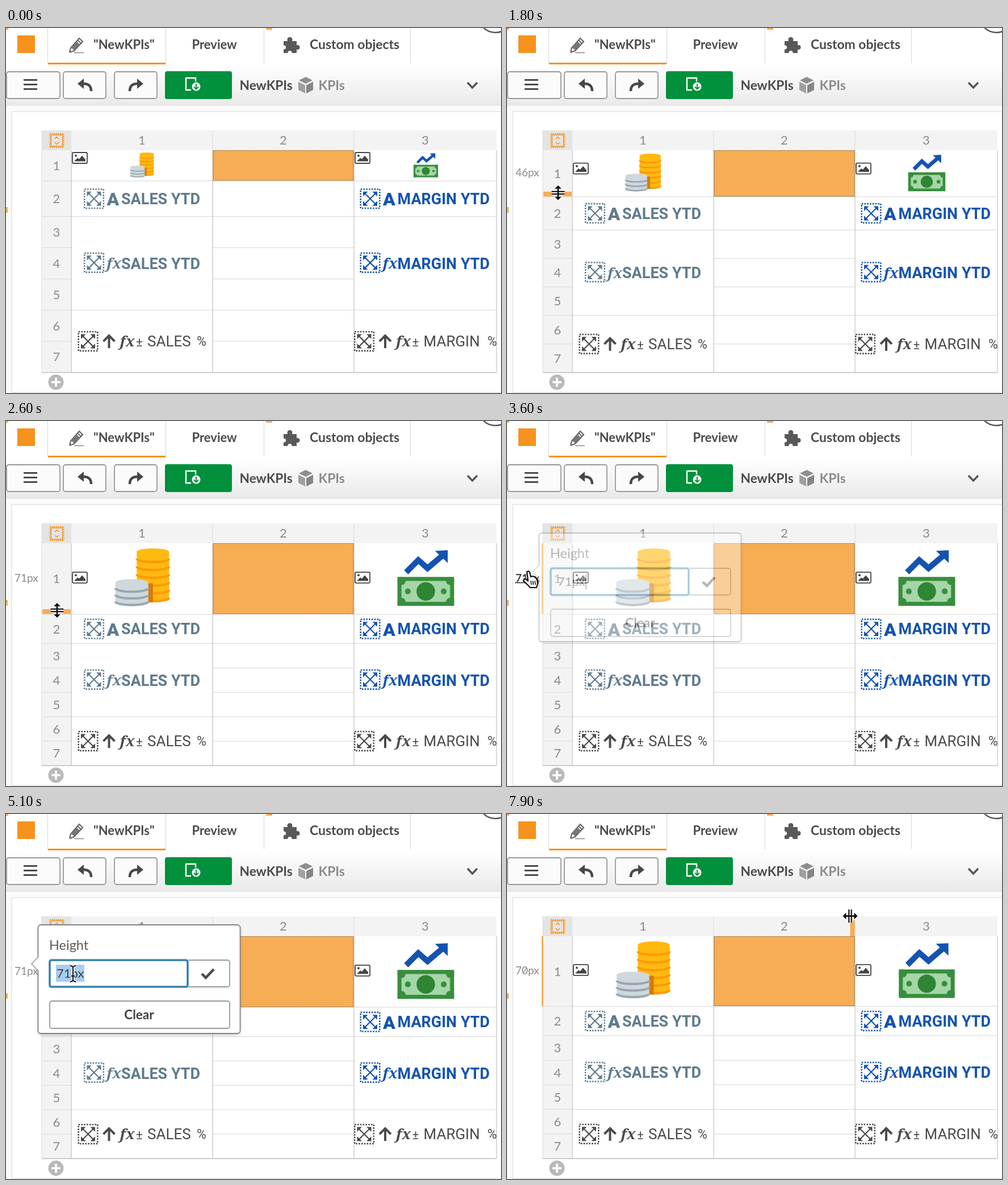
Recreate the animation shown at these times as an HTML page with a canvas. Size 872x642 px, loop 8 s.

```html
<!DOCTYPE html>
<html lang="en">
<head>
<meta charset="utf-8">
<title>Row height editor</title>
<style>
html, body { margin: 0; width: 100%; height: 100%; overflow: hidden; background: #fff; }
canvas { display: block; }
</style>
</head>
<body>
<canvas id="stage" width="872" height="642"></canvas>
<script>
const stage = document.getElementById('stage').getContext('2d');
const layer = document.createElement('canvas');
layer.width = 872;
layer.height = 642;
let c = stage;
const LOOP = 8000, STEP = 100, TOP = 215, BOTTOM = 606, PX = 1.76;
const ORANGE = '#f6921e', SOFT = '#f7ad54', STEEL = '#5f7b8c', BLUE = '#1453b0', INK = '#4a4a4a';
const UI = 'Lato, "Open Sans", sans-serif', CELL = 'Roboto, sans-serif', SERIF = '"Noto Serif", serif';

// ---- helpers ----
function box(x, y, w, h, color) { c.fillStyle = color; c.fillRect(x, y, w, h); }
function path(points, closed) {
  c.beginPath();
  points.forEach(([x, y]) => c.lineTo(x, y));
  if (closed) c.closePath();
}
function fill(color) { c.fillStyle = color; c.fill(); }
function stroke(color, width) { c.strokeStyle = color; c.lineWidth = width; c.stroke(); }
function poly(points, color) { path(points, true); fill(color); }
function line(points, color, width) { path(points); stroke(color, width); }
function disc(x, y, r, color) { c.beginPath(); c.arc(x, y, r, 0, 7); fill(color); }
function panel(x, y, w, h, r, border, width, color) {
  c.beginPath();
  c.roundRect(x, y, w, h, r);
  if (color) fill(color);
  if (border) stroke(border, width);
}
// y is the middle of the capitals
function text(s, x, y, size, color, style = '', align = 'left', family = UI) {
  c.font = `${style} ${size}px ${family}`;
  c.fillStyle = color;
  c.textAlign = align;
  c.fillText(s, x, y + size * .36);
}
function sizeText(s, x, y, size, color, style) {
  text(s, x, y, size, color, style);
  const i = s.indexOf('0');
  if (i < 0) return;
  const left = x + c.measureText(s.slice(0, i)).width, w = c.measureText('0').width;
  line([[left + w * .3, y + size * .2], [left + w * .7, y - size * .2]], color, 1.3);
}
function at(x, y, scale, draw) {
  c.save();
  c.translate(x, y);
  c.scale(scale, scale);
  draw();
  c.restore();
}
// keys: [time, value, value...], linear between neighbours
function key(t, keys) {
  const i = keys.findIndex(k => k[0] > t);
  if (i === 0) return keys[0].slice(1);
  if (i < 0) return keys[keys.length - 1].slice(1);
  const a = keys[i - 1], b = keys[i], u = (t - a[0]) / (b[0] - a[0]);
  return a.slice(1).map((v, j) => v + (b[j + 1] - v) * u);
}

// ---- top bars ----
function bars() {
  box(0, 0, 872, 642, '#fff');
  const shade = c.createLinearGradient(0, 64, 0, 137);
  shade.addColorStop(0, '#fff');
  shade.addColorStop(1, '#e9e9e9');
  box(0, 64, 872, 73, shade);
  box(0, 137, 872, 505, '#fbfbfb');
  panel(10, 147, 880, 494, 0, '#e3e3e3', 1.5, '#fff');
  [73, 281, 454, 712].forEach(x => box(x, 0, 1, 62, '#d6d6d6'));
  box(74, 61, 207, 3, ORANGE);
  box(0, 0, 4, 3, SOFT);
  box(458, 0, 11, 3, SOFT);
  box(0, 315, 3, 10, SOFT);
  box(20, 13, 31, 31, ORANGE);
  c.beginPath();
  c.arc(862, -22, 30, 0, Math.PI);
  stroke('#555', 2.5);

  // pencil
  line([[112, 43], [114, 35], [129, 18], [135, 24], [120, 40], [112, 43]], '#666', 2.2);
  line([[126, 21], [132, 27]], '#666', 2);
  poly([[115, 35], [125, 24], [130, 29], [120, 39]], '#777');
  line([[120, 43.5], [137, 43.5]], '#777', 1.3);
  text('"NewKPIs"', 154, 29, 22, INK, 'bold');
  text('Preview', 327.5, 29, 22, INK, 'bold');
  // puzzle piece
  box(489, 23, 23, 21, '#595959');
  disc(500, 20.5, 4.5, '#595959');
  disc(513.5, 34, 4, '#595959');
  disc(489.5, 34, 3.6, '#fff');
  disc(500, 43.5, 3.6, '#fff');
  text('Custom objects', 535, 29, 22.9, INK, 'bold');

  [[1, 94], [101, 75], [191, 75]].forEach(([x, w]) => panel(x, 77, w, 47, 4, '#999', 1.8, '#fbfbfb'));
  [90, 98, 106].forEach(y => box(31, y, 24, 2.8, '#404040'));
  [[126, 1], [242, -1]].forEach(([x, dir]) => {
    c.save();
    c.translate(x, 98);
    c.scale(dir, 1);
    poly([[0, 0], [11, -9], [11, 9]], '#484848');
    c.beginPath();
    c.moveTo(9, 0);
    c.quadraticCurveTo(24, -1, 24, 13);
    stroke('#484848', 4.5);
    c.restore();
  });
  panel(280, 76, 118, 49, 4, null, 0, '#02903d');
  line([[326, 109], [317, 109], [317, 88], [334, 88], [334, 95]], '#fff', 2.4);
  disc(335, 103, 9, '#02903d');
  disc(335, 103, 7.5, '#fff');
  line([[335, 98], [335, 107]], '#02903d', 2);
  line([[331, 103.5], [335, 107.5], [339, 103.5]], '#02903d', 2);
  text('NewKPIs', 411.5, 101, 22.7, INK, 'bold');
  poly([[528, 86], [540, 92], [528, 98], [516, 92]], '#8e8e8e');
  poly([[515, 94.5], [527, 100.5], [527, 115], [515, 109]], '#a0a0a0');
  poly([[541, 94.5], [529, 100.5], [529, 115], [541, 109]], '#858585');
  text('KPIs', 550.5, 101, 22.9, '#8a8a8a', 'bold');
  line([[813, 96], [821.5, 105], [830, 96]], '#555', 3.4);
}

// ---- small icons ----
function pictureIcon(x, y) {
  panel(x + 1, y - 9.5, 26, 19, 2, '#444', 1.8, '#fff');
  disc(x + 7, y - 4, 2, '#444');
  poly([[x + 4, y + 6], [x + 10, y], [x + 13, y + 2], [x + 18, y - 4], [x + 24, y + 3], [x + 24, y + 6]], '#444');
}
function anchorIcon(x, y, color) {
  at(x, y, 1, () => {
    c.setLineDash([2.6, 2.2]);
    c.strokeStyle = color;
    c.lineWidth = 2.6;
    c.strokeRect(-16.8, -16.8, 33.6, 33.6);
    c.setLineDash([]);
    line([[-10, -10], [10, 10]], color, 2.2);
    line([[-10, 10], [10, -10]], color, 2.2);
    [-1, 1].forEach(a => [-1, 1].forEach(b =>
      poly([[12.5 * a, 12.5 * b], [4 * a, 12.5 * b], [12.5 * a, 4 * b]], color)));
  });
}
function fx(x, y, color) {
  text('fx', x, y, 26, color, 'italic bold', 'left', SERIF);
}
function upArrow(x, y) {
  line([[x, y + 12], [x, y - 9]], INK, 4);
  line([[x - 10, y], [x, y - 10], [x + 10, y]], INK, 4);
}

// ---- pictures, drawn in a 100 unit square ----
function stack(x, w, top, count, step, light, dark) {
  const mid = x + w / 2, r = w / 2, flat = 6;
  for (let i = count - 1; i >= 0; i--) {
    const y = top + flat + i * step;
    c.beginPath();
    c.ellipse(mid, y, r, flat, 0, Math.PI, 0);
    c.lineTo(x + w, y + step);
    c.ellipse(mid, y + step, r, flat, 0, 0, Math.PI);
    c.closePath();
    fill(light);
    c.beginPath();
    c.ellipse(mid, y + step - 2, r, flat, 0, 0, Math.PI);
    stroke(dark, 4);
  }
  c.beginPath();
  c.ellipse(mid, top + flat, r, flat, 0, 0, 7);
  fill(light);
}
function coins() {
  stack(41, 56, 0, 6, 13.5, '#ffb90f', '#fb9a06');
  box(55, 60, 14, 33, '#d87a08');
  stack(4, 57, 53, 3, 11.5, '#cfd8dc', '#9aa7b2');
}
function money() {
  line([[16, 41], [37, 20], [53, 34], [80, 11]], BLUE, 10);
  poly([[66, 4], [88, 3], [88, 25]], BLUE);
  box(1, 49, 98, 50, '#388e3c');
  box(8, 56, 84, 36, '#a5d6a7');
  [8, 92].forEach(x => [56, 92].forEach(y => disc(x, y, 7, '#388e3c')));
  disc(50, 74, 16, '#2e8534');
  disc(19, 74, 5, '#388e3c');
  disc(81, 74, 5, '#388e3c');
}

// ---- table ----
function rowEdges(h) {
  const second = 62.5 - (h - 54) * .156, rest = (BOTTOM - TOP - h - second) / 5;
  const edges = [TOP, TOP + h, TOP + h + second];
  for (let i = 1; i <= 5; i++) edges.push(edges[2] + rest * i);
  return edges;
}
function table(edges, h) {
  const mid = (a, b) => (edges[a] + edges[b]) / 2;
  box(63, 180, 801, 35, '#f3f3f3');
  box(63, TOP, 52, BOTTOM - TOP, '#f3f3f3');
  box(63, 180, 52, 35, '#e4e4e4');
  c.setLineDash([2, 1.5]);
  panel(77.5, 186, 24, 24, 0, ORANGE, 2);
  c.setLineDash([]);
  panel(79.5, 188, 20, 20, 0, ORANGE, 1.4);
  line([[86, 195], [89.5, 191.5], [93, 195]], ORANGE, 1.5);
  line([[86, 201], [89.5, 204.5], [93, 201]], ORANGE, 1.5);
  [239.5, 488.5, 738.5].forEach((x, i) => text(i + 1, x, 197, 22, '#8a8a8a', '', 'center'));

  edges.slice(1).forEach((y, i) => {
    const n = i + 1;
    box(63, y - .5, 52, 1, '#d9d9d9');
    box(364, y - .5, 249, 1, '#d4d4d4');
    if ([1, 2, 5, 7].includes(n)) {
      box(115, y - .5, 249, 1, '#d4d4d4');
      box(613, y - .5, 251, 1, '#d4d4d4');
    }
    text(n, 89, mid(i, n), 22, '#8a8a8a', '', 'center');
  });
  box(63, BOTTOM - .5, 801, 1.2, '#bcbcbc');
  [364, 613].forEach(x => box(x - .5, 180, 1, 35, '#d9d9d9'));
  [115, 364, 613, 864].forEach(x => box(x - .5, TOP, 1.2, BOTTOM - TOP, '#c2c2c2'));
  box(62.5, 180, 1, BOTTOM - 180, '#dedede');

  box(364.5, TOP, 248, h - .5, SOFT);
  c.setLineDash([1.5, 1.5]);
  c.strokeStyle = '#6b5a3e';
  c.lineWidth = 1.2;
  c.strokeRect(365, TOP + .5, 247, h - 1.5);
  c.setLineDash([]);

  const side = h * .815, top = mid(0, 1) - h * .018 - side / 2;
  at(239.5 - side / 2, top, side / 100, coins);
  at(739.5 - side / 2, top, side / 100, money);
  const lift = Math.max(2.2, 13.5 - (h - 54) * .167);
  pictureIcon(116, mid(0, 1) - lift);
  pictureIcon(614, mid(0, 1) - lift);

  const y2 = mid(1, 2), y4 = mid(2, 5), y6 = mid(5, 7);
  [[155, STEEL, 'SALES YTD'], [641.5, BLUE, 'MARGIN YTD']].forEach(([x, color, label]) => {
    anchorIcon(x, y2, color);
    text('A', x + 22.5, y2 + .5, 32, color, '900', 'left', CELL);
    text(label, x + 48, y2, 27, color, 'bold', 'left', CELL);
    anchorIcon(x, y4 - 1, color);
    fx(x + 22, y4, color);
    text(label, x + 48, y4, 27, color, 'bold', 'left', CELL);
  });
  [[144.5, 'SALES', 336], [631, 'MARGIN', 848]].forEach(([x, label, percent]) => {
    anchorIcon(x, y6, INK);
    upArrow(x + 37, y6);
    fx(x + 56, y6, INK);
    text('±', x + 84.5, y6 + 1, 22, INK, '', 'left', CELL);
    text(label, x + 104.5, y6, 26, INK, '', 'left', CELL);
    text('%', percent, y6, 23, INK, '', 'left', CELL);
  });

  disc(88, 623, 13.5, '#b9b9b9');
  box(80, 621.2, 16, 3.6, '#fff');
  box(86.2, 615, 3.6, 16, '#fff');
}

// ---- height popup, painted opaque on its own layer and then blended ----
function popupContent(t) {
  c.clearRect(0, 0, 872, 642);
  c.shadowColor = 'rgba(0,0,0,.28)';
  c.shadowBlur = 5;
  c.shadowOffsetY = 2;
  panel(56.5, 195, 356, 191, 5, null, 0, '#fff');
  c.shadowColor = 'transparent';
  panel(56.5, 195, 356, 191, 5, '#858585', 1.8);
  poly([[58, 251], [45, 263.5], [58, 276]], '#fff');
  line([[57, 251], [45, 263.5], [57, 276]], '#999', 1.5);
  text('Height', 76, 231, 23.5, '#595959');
  panel(300, 257, 94, 47, 4, '#999', 1.8, '#fff');
  panel(77, 257, 243, 47, 3, '#b9d8ee', 5, '#fff');
  panel(77, 257, 243, 47, 3, '#23719f', 2.6);
  line([[345, 281], [352, 288], [366, 273]], INK, 4.5);
  const value = t < 6000 ? '71px' : t < 6100 ? '7' : '70';
  const picked = t >= 5000 && t < 6000;
  if (picked) box(88, 265, 50, 30, '#a9cdf0');
  sizeText(value, 89, 280, 22, '#404040');
  if (!picked) box(90 + c.measureText(value).width, 268, 1.5, 26, '#333');
  panel(77, 329, 317, 48, 4, '#999', 1.8, '#fff');
  text('Clear', 234.5, 352.5, 22.6, '#404040', 'bold', 'center');
}
function popup(t) {
  const [alpha] = key(t, [[3500, 0], [3600, .4], [3700, .8], [3800, 1]]);
  c = layer.getContext('2d');
  popupContent(t);
  c = stage;
  c.globalAlpha = t < 6500 ? alpha : .25;
  c.drawImage(layer, 0, 3.4 * (1 - alpha));
  c.globalAlpha = 1;
}

// ---- pointers ----
function resizer() {
  c.lineJoin = 'round';
  [['#fff', 3], ['#111', 0]].forEach(([color, rim]) => {
    line([[0, -9], [0, 9]], color, 2.8 + rim);
    [-1, 1].forEach(d => {
      line([[-11.5, 2.2 * d], [11.5, 2.2 * d]], color, 2.2 + rim);
      path([[0, 13 * d], [-6, 7 * d], [6, 7 * d]], true);
      fill(color);
      if (rim) stroke(color, rim);
    });
  });
}
const pointers = {
  arrow() {
    path([[0, 0], [0, 23], [5.5, 18], [9.5, 27], [13.5, 25], [9.5, 16.5], [17, 16]], true);
    stroke('#fff', 3.5);
    fill('#111');
  },
  row: resizer,
  column() { c.rotate(Math.PI / 2); resizer(); },
  hand() {
    path([[-2, 1], [1, 0], [3, 2], [5, 10], [9, 9], [13, 11], [16, 15], [17, 22], [15, 29],
      [4, 29], [-3, 22], [-8, 17], [-7, 14], [-4, 14], [0, 17]], true);
    c.lineJoin = 'round';
    fill('#fff');
    stroke('#111', 2.2);
    [5, 8.5, 12].forEach(x => line([[x, 17], [x + 1, 24]], '#111', 1.6));
  },
  beam() {
    [['#fff', 4.5], ['#111', 2]].forEach(([color, w]) => {
      line([[0, -12], [0, 12]], color, w);
      line([[-5, -14.5], [0, -12], [5, -14.5]], color, w);
      line([[-5, 14.5], [0, 12], [5, 14.5]], color, w);
      line([[-3, 4], [3, 4]], color, w);
    });
  }
};
const SHAPES = [[100, ''], [1300, 'arrow'], [2700, 'row'], [3200, 'arrow'], [4000, 'hand'],
  [6000, 'beam'], [7100, ''], [7700, 'arrow'], [LOOP, 'column']];
const TRAIL = [[100, 300, 560], [900, 230, 420], [1200, 105, 290], [1400, 90, 261], [2600, 90, 333],
  [3200, 37, 264], [3700, 37, 264], [4400, 110, 285], [5000, 118, 281], [7100, 118, 281],
  [7300, 280, 286], [7700, 598, 183], [7900, 604.5, 179.5]];

function draw(t) {
  const [dragged] = key(t, [[1600, 54], [1700, 62], [2000, 121.5], [2300, 125.8], [2500, 125]]);
  const h = t < 6500 ? dragged : 70 * PX;
  const edges = rowEdges(h), gripping = t >= 1300 && t < 2700;
  bars();
  table(edges, h);
  if (gripping) box(64, edges[1] - 9, 50, 8.5, SOFT);
  if (t >= 2700) box(61, TOP, 3, h, SOFT);
  if (t >= 7700) box(604.5, 180, 8, 35, SOFT);
  if (t >= 1700) {
    const hover = t >= 3200 && t < 3800;
    sizeText(Math.round(h / PX) + 'px', 15, edges[0] + h / 2 - 1.5, 19, hover ? '#404040' : '#8c8c8c', hover ? 'bold' : '');
    if (hover) box(14, 283.5, 42, 1.8, '#404040');
  }
  if (t >= 3500 && t < 6600) popup(t);
  const shape = SHAPES.find(s => t < s[0])[1];
  if (shape) {
    let [x, y] = key(t, TRAIL);
    if (t >= 1400 && t < 2700) y = edges[1] - 7;
    at(x, y, 1, pointers[shape]);
  }
}

const start = performance.now();
function frame() {
  const t = (performance.now() - start) % LOOP;
  draw(Math.floor(t / STEP) * STEP);
  requestAnimationFrame(frame);
}
frame();
</script>
</body>
</html>
```
